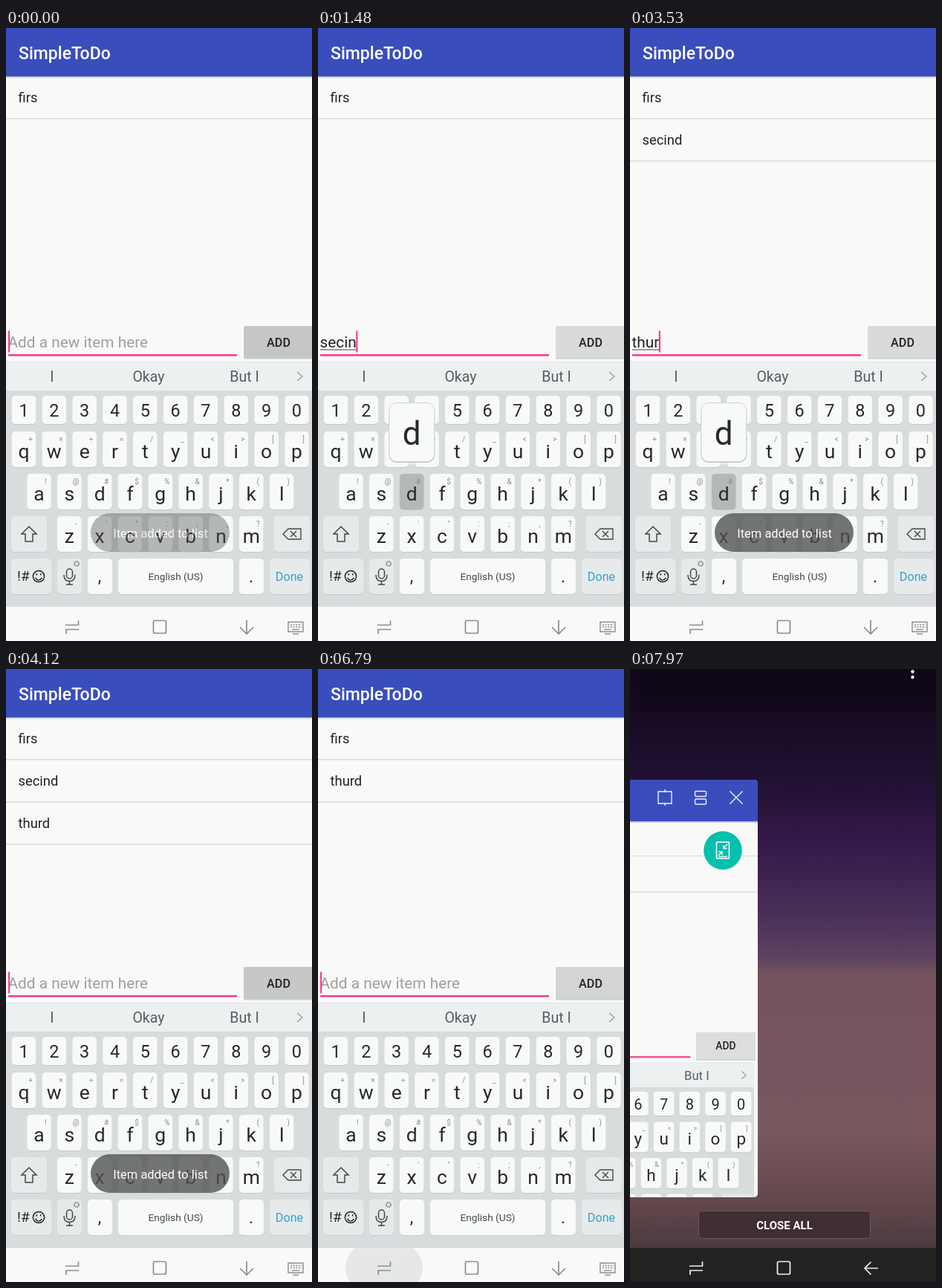
An HTML page that plays this animation: 412x825 px, repeating every 8 s.

```html
<!DOCTYPE html>
<html lang="en">
<head>
<meta charset="utf-8">
<title>SimpleToDo</title>
<style>
html, body { margin: 0; width: 100%; height: 100%; overflow: hidden; background: #f8f9f7; }
svg { display: block; width: 412px; height: 825px; font-family: Roboto, sans-serif; }
</style>
</head>
<body>
<script>
const NS = 'http://www.w3.org/2000/svg';

function el(parent, tag, attrs = {}, text) {
  const node = document.createElementNS(NS, tag);
  set(node, attrs);
  if (text !== undefined) node.textContent = text;
  parent.appendChild(node);
  return node;
}
function set(node, attrs) {
  for (const k in attrs) node.setAttribute(k, attrs[k]);
}
function show(node, on) {
  node.style.display = on ? '' : 'none';
}
function rect(p, x, y, width, height, fill, more) {
  return el(p, 'rect', { x, y, width, height, fill, ...more });
}
function label(p, x, y, size, fill, text, more) {
  return el(p, 'text', { x, y, 'font-size': size, fill, ...more }, text);
}
function line(p, d, stroke, width = 1.5) {
  return el(p, 'path', { d, stroke, 'stroke-width': width, fill: 'none' });
}
const mid = { 'text-anchor': 'middle' };
const medium = { 'font-weight': 500 };

// Linear interpolation through [time, value] steps.
function track(steps, t) {
  if (t <= steps[0][0]) return steps[0][1];
  for (let i = 1; i < steps.length; i++) {
    const [a, u] = steps[i - 1], [b, v] = steps[i];
    if (t < b) return u + (v - u) * (t - a) / (b - a);
  }
  return steps[steps.length - 1][1];
}

const svg = el(document.body, 'svg', { viewBox: '0 0 412 825' });
const defs = el(svg, 'defs');
const clipRect = el(el(defs, 'clipPath', { id: 'cardClip' }), 'rect');
rect(el(defs, 'clipPath', { id: 'rowClip' }), 0, 123, 412, 56);
rect(el(defs, 'clipPath', { id: 'navClip' }), 0, 779, 412, 46);
const sky = el(defs, 'linearGradient', { id: 'sky', x1: 0, y1: 0, x2: 0, y2: 1 });
[[0, '#12081b'], [.07, '#170a22'], [.17, '#1f1030'], [.29, '#351a4c'], [.4, '#4a2f58'],
 [.47, '#5e4260'], [.5, '#75535f'], [.75, '#79575f'], [.86, '#66494f'], [.94, '#4c3c40'], [1, '#3c3032']]
  .forEach(([offset, c]) => el(sky, 'stop', { offset, 'stop-color': c }));

/* Overview screen behind the app */
const home = el(svg, 'g');
rect(home, 0, 0, 412, 825, 'url(#sky)');
rect(home, 12, 0, 400, 59, '#0c0512', { opacity: .4 });
[-4, 3.5, 11].forEach(cy => el(home, 'circle', { cx: 380.5, cy, r: 2.2, fill: '#fff' }));
rect(home, 92.5, 729.5, 231, 37, '#402e34', { rx: 4, stroke: '#6d555b' });
label(home, 208, 754, 15, '#fff', 'CLOSE ALL', { ...mid, 'font-weight': 700 });

/* App */
const card = el(svg, 'g', { 'clip-path': 'url(#cardClip)' });
const app = el(card, 'g');
rect(app, -20, -20, 460, 1000, '#f9faf8');
rect(app, -20, -20, 460, 85, '#394ebc');
rect(app, -20, 65, 460, 1, '#a9adc4');
rect(app, -20, 66, 460, 1.5, '#dfe1e2');
const title = label(app, 17, 42, 23, '#fff', 'SimpleToDo', medium);

const press = el(app, 'g', { 'clip-path': 'url(#rowClip)' });
rect(press, 0, 123, 412, 56, '#e9eae8');
const ripple = el(press, 'circle', { cx: 222, cy: 161, fill: '#d8dbda' });

const rules = el(app, 'g');
const rows = [0, 1, 2].map(i => ({
  text: label(app, 16.5, 100 + 57 * i, 18.4, '#222', ''),
  rule: rect(rules, -10, 121 + 57 * i, 440, 1.8, '#dfe1df')
}));

const hint = label(app, 2.5, 430, 20.8, '#9da09e', 'Add a new item here');
const entry = label(app, 2.5, 430, 20.8, '#222', '');
const composing = rect(app, 3, 432.5, 0, 1, '#444');
rect(app, 3, 439, 308, 2.6, '#fb3c91');
const cursor = rect(app, 3, 407.5, 2.2, 29, '#fb3c91');
rect(app, 320, 402.5, 94, 43, '#c9cccb', { rx: 2 });
const addBtn = rect(app, 320, 401, 94, 43, '#d8dcdd', { rx: 2 });
label(app, 367, 428.5, 16.2, '#222', 'ADD', { ...mid, ...medium });

/* Keyboard */
const kb = el(app, 'g');
rect(kb, 0, 449, 412, 2, '#e2e5e5');
rect(kb, 0, 450, 412, 38, '#ecf0f1');
rect(kb, 0, 488, 412, 291, '#d8dcdd');
[[62, 'I'], [192, 'Okay'], [321, 'But I']].forEach(([x, s]) => label(kb, x, 476, 19.6, '#5a5e60', s, mid));
line(kb, 'M392 463L399 469L392 475', '#999d9f', 1.4);

const INK = '#272a2b', PLAIN = '#f8faf8', SOFT = '#e6eaeb';
const caps = {};
function cap(x, y, w, h, fill = PLAIN) {
  rect(kb, x, y + 1, w, h, '#c5cacc', { rx: 5 });
  return rect(kb, x, y, w, h, fill, { rx: 5 });
}
function keyRow(letters, hints, first, top, height, size, base) {
  [...letters].forEach((ch, i) => {
    const cx = first + 40.83 * i;
    caps[ch] = { cx, top, box: cap(cx - 16.3, top, 32.6, height) };
    label(kb, cx, base, size, INK, ch, mid);
    if (hints[i]) label(kb, cx + 9, top + 14, 10, '#888d8f', hints[i], mid);
  });
}
keyRow('1234567890', '', 24, 495, 38, 23.5, 523);
keyRow('qwertyuiop', '+×÷=/_<>[]', 24, 543, 48, 26.5, 579);
keyRow('asdfghjkl', '!@#$%&*()', 44.5, 600, 48, 26.5, 636);
keyRow('zxcvbnm', '-\'":;,?', 85.3, 657, 48, 26.5, 693);

cap(7, 657, 48, 48, SOFT);
cap(361, 657, 48, 48, SOFT);
cap(7, 714, 54, 48, SOFT);
cap(69, 714, 33, 48, SOFT);
cap(110, 714, 33, 48);
cap(151, 714, 155, 48);
cap(314, 714, 33, 48);
cap(355, 714, 54, 48, SOFT);
line(kb, 'M31 671L41 681H36V691H26V681H21Z', '#444849');
line(kb, 'M380 674H397V688H380L373 681ZM383 677L391 685M391 677L383 685', '#444849', 1.4);
label(kb, 15, 744, 19, INK, '!#');
el(kb, 'circle', { cx: 44, cy: 738, r: 7.6, fill: 'none', stroke: INK, 'stroke-width': 1.5 });
line(kb, 'M39.5 740Q44 746 48.5 740M41.3 734V736.5M46.7 734V736.5', INK);
rect(kb, 81.5, 728, 8, 13, 'none', { rx: 4, stroke: '#444849', 'stroke-width': 1.5 });
line(kb, 'M78 736Q78 744.5 85.5 744.5T93 736M85.5 744.5V749M81 749H90', '#444849');
el(kb, 'circle', { cx: 95, cy: 721, r: 3, fill: 'none', stroke: '#8b9092', 'stroke-width': 2, 'stroke-dasharray': '1.8 .6' });
label(kb, 126, 746, 23, INK, ',', mid);
label(kb, 228.5, 743, 13.7, '#44484a', 'English (US)', mid);
label(kb, 330, 746, 23, INK, '.', mid);
label(kb, 381.5, 744, 16.2, '#35a2c6', 'Done', mid);

const pop = el(kb, 'g');
line(pop, 'M-6 79L0 85L6 79Z', 'none').setAttribute('fill', '#eef1f1');
rect(pop, -31, 1, 62, 80, '#bfc4c6', { rx: 11 });
rect(pop, -30.5, .5, 61, 79, PLAIN, { rx: 10, stroke: '#cfd4d5' });
const popText = label(pop, 0, 57, 44, INK, '', mid);

/* Controls laid over the card in the overview */
const tools = el(card, 'g');
rect(tools, 28, 149, 359, 56, '#394ebc');
rect(tools, 28, 205, 359, 2, '#c9cbd3');
label(tools, 71, 178, 17, '#fff', 'SimpleToDo', medium);
line(tools, 'M258 165H253V181H258M266 165H271V181H266M258 165H266M258 181H266M262 162V166M262 180V184', '#eef', 1.4);
rect(tools, 302.5, 164.5, 15, 7, 'none', { rx: 1.5, stroke: '#eef', 'stroke-width': 1.4 });
rect(tools, 302.5, 175, 15, 7, 'none', { rx: 1.5, stroke: '#eef', 'stroke-width': 1.4 });
line(tools, 'M349.500 164.500L366.500 181.500M366.500 164.500L349.500 181.500', '#eef');
el(tools, 'circle', { cx: 340, cy: 245, r: 26, fill: '#8fcfc6', opacity: .5 });
el(tools, 'circle', { cx: 340, cy: 244, r: 25.7, fill: '#07bfad' });
rect(tools, 331.5, 233, 17, 22, 'none', { rx: 1, stroke: '#fff', 'stroke-width': 1.6 });
line(tools, 'M346 236L341 241M341 237V241.500H345.500M334 251L339 246M334.500 246H339V250.500M334 252.500H346', '#fff', 1.4);

/* Toast */
const toast = el(svg, 'g');
rect(toast, 114, 653, 187, 52, '#505252', { rx: 26, opacity: .79 });
label(toast, 208, 686, 16.5, '#fff', 'Item added to list', mid);

/* Navigation bar */
const nav = el(svg, 'g', { 'clip-path': 'url(#navClip)' });
const navBg = rect(nav, 0, 779, 412, 46, '#f8f9f8');
const navTap = el(nav, 'ellipse', { cx: 89, cy: 806, rx: 52, ry: 40, fill: '#e6e8e8' });
const icons = el(nav, 'g', { fill: 'none', 'stroke-width': 1.7 });
el(icons, 'path', { d: 'M80 803.500H97.500V797.500M98 809.500H81V815.500' });
el(icons, 'rect', { x: 198.500, y: 797.500, width: 17, height: 17, rx: 2 });
const downArrow = el(icons, 'path', { d: 'M324 797V815M315 806.500L324 815.500L333 806.500' });
const backArrow = el(icons, 'path', { d: 'M334 806.500H316M324.500 798L316 806.500L324.500 815' });
const kbIcon = el(icons, 'g', { 'stroke-width': 1.4 });
el(kbIcon, 'path', { d: 'M380 799.500H400V812.500H380ZM386 815.500H394' });
el(kbIcon, 'path', { d: 'M383 803H398M383 806H398', 'stroke-dasharray': '2 1.6' });
el(kbIcon, 'path', { d: 'M385 809.500H395' });

/* Timeline */
const LOOP = 8000;
const TAPS = [
  ['s', 290, 440], ['e', 590, 740], ['c', 740, 880], ['i', 880, 1030], ['n', 1030, 1180], ['d', 1330, 1630],
  ['t', 2500, 2650], ['h', 2950, 3090], ['u', 3090, 3240], ['r', 3240, 3390], ['d', 3530, 3680]
];
const ADDED = [[2210, 'secind'], [3970, 'thurd']];
const REMOVED = 5310;
const BLINK_OFF = [[4420, 4860], [5310, 5900], [6340, 6790]];
const TOAST = [[0, .5], [140, .2], [290, 0], [2200, 0], [2360, .6], [2500, 1], [4130, 1], [4560, 0]];
const BUTTON = [[0, 197], [590, 217], [1900, 217], [2060, 190], [2360, 204], [2800, 209], [3090, 217],
  [3680, 217], [3830, 190], [4130, 198], [4570, 208], [7240, 212], [7400, 220]];
const PRESS = [[4720, 0], [4870, .5], [5020, 1], [5470, 1], [5900, 0]];
const RADIUS = [[4860, 6], [5460, 20]];
const SWIPE = [[7530, 0], [7680, -25], [7830, -110], [7968, -215]];
const SHRINK = 7090, SETTLED = 7240, OVERVIEW = 7380;

function drawText(t) {
  const start = ADDED.reduce((a, [at]) => at <= t ? at : a, 0);
  const typed = TAPS.filter(([, , up]) => up > start && up <= t).map(k => k[0]).join('');
  entry.textContent = typed;
  const w = typed ? entry.getComputedTextLength() : 0;
  show(hint, !typed);
  set(composing, { width: w });
  set(cursor, { x: 3 + (w ? w - 1 : 0) });
  show(cursor, !BLINK_OFF.some(([a, b]) => t >= a && t < b) && t < OVERVIEW);

  const items = ['firs', ...ADDED.filter(([at]) => at <= t).map(a => a[1])];
  if (t >= REMOVED) items.splice(1, 1);
  rows.forEach((r, i) => {
    r.text.textContent = items[i] || '';
    show(r.rule, i < items.length);
  });
}

function drawKeys(t) {
  const tap = TAPS.find(([, down, up]) => t >= down && t < up);
  for (const k in caps) caps[k].box.setAttribute('fill', tap && tap[0] === k ? '#b4b8b9' : PLAIN);
  show(pop, tap);
  if (!tap) return;
  const { cx, top } = caps[tap[0]];
  pop.setAttribute('transform', `translate(${cx} ${top - 96})`);
  popText.textContent = tap[0];
}

function drawCard(t, q) {
  const away = t >= SHRINK, overview = t >= OVERVIEW;
  let x, y, w, h, ox, oy, s;
  if (overview) {
    const dx = track(SWIPE, q);
    [x, y, w, h, ox, oy, s] = [28 + dx, 149, 359, 562, 32 + dx, 148, .85];
    tools.setAttribute('transform', `translate(${dx} 0)`);
  } else {
    const p = !away ? 0 : t < SETTLED ? .5 : 1;
    [x, y, w, h] = [28 * p, 140 * p, 412 - 53 * p, 825 - 249 * p];
    [ox, oy, s] = [29.5 * p, 140.8 * p, 1 - .143 * p];
  }
  set(clipRect, { x, y, width: w, height: h, rx: overview ? 5 : 0 });
  app.setAttribute('transform', `translate(${ox} ${oy}) scale(${s})`);
  show(home, away);
  show(tools, overview);
  show(title, !overview);
  show(kb, !away || overview);
  show(rules, !away || overview);

  navBg.setAttribute('fill', away ? '#242121' : '#f8f9f8');
  icons.setAttribute('stroke', away ? '#f2f2f2' : '#8a8e8f');
  show(navTap, t >= 6790 && !away);
  show(downArrow, !away);
  show(kbIcon, !away);
  show(backArrow, away);
}

function draw(t) {
  // The screen refreshes about seven times a second.
  const q = 140 + 147.7 * Math.floor((t - 128) / 147.7);
  drawText(t);
  drawKeys(t);
  drawCard(t, q);
  const g = Math.round(track(BUTTON, q));
  addBtn.setAttribute('fill', `rgb(${g},${g + 2},${g + 1})`);
  toast.setAttribute('opacity', track(TOAST, q));
  press.setAttribute('opacity', track(PRESS, q));
  ripple.setAttribute('r', track(RADIUS, q));
}

const begin = performance.now();
function tick() {
  draw((performance.now() - begin) % LOOP);
  requestAnimationFrame(tick);
}
tick();
</script>
</body>
</html>
```
